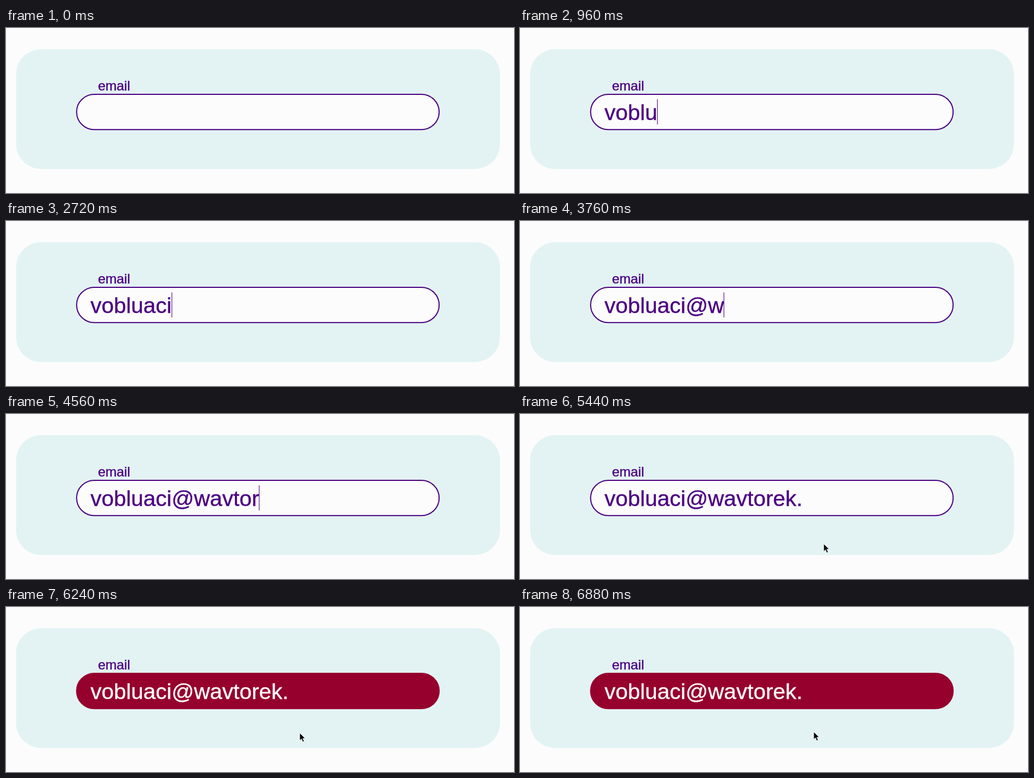
Animation, 908 px wide and 296 px high, one loop 8 s. Source, as an HTML page:

```html
<!DOCTYPE html>
<html lang="en">
<head>
<meta charset="utf-8">
<title>Email field</title>
<style>
  html, body { margin: 0; width: 100%; height: 100%; overflow: hidden; background: #fcfcfc; }
  svg { display: block; }
  text {
    font-family: "Liberation Sans", Arial, sans-serif; font-kerning: none;
    fill: #4b0082; stroke: #4b0082; stroke-width: .4;
  }
  #field { fill: #fcfcfc; stroke: #4b0082; stroke-width: 2; }
  #value { font-size: 39.5px; }
  #caret { fill: #4b0082; }
  .invalid #field { fill: #96002d; stroke: #96002d; }
  .invalid #value { fill: #fff; stroke: #fff; }
</style>
</head>
<body>
<svg id="stage" width="908" height="296" viewBox="0 0 908 296">
  <rect x="18" y="38" width="865" height="215" rx="45" fill="#e3f3f3"/>
  <text x="164.5" y="112" font-size="24">email</text>
  <rect id="field" x="126.2" y="119" width="648" height="63.3" rx="31.6"/>
  <text id="value" x="151" y="165"></text>
  <rect id="caret" y="128" width="1" height="45"/>
  <path id="pointer" d="M0 0V13.6L3.2 10.7L5.4 16L7.9 15L5.6 9.8H9.8Z" fill="#000" stroke="#fff" stroke-width=".8"/>
</svg>
<script>
const LOOP = 8000, KEY_GAP = 80;
const FOCUS = 160, LEAVE = 5440, INVALID = 6240, NUDGE = 6880;
const [stage, value, caret, pointer] =
  ["stage", "value", "caret", "pointer"].map(id => document.getElementById(id));

// Bursts of keys, each with its start time; "<" is backspace
const bursts = {
  240: "vo", 560: "bl", 960: "u", 1120: "cc", 1600: "<", 1760: "<",
  2000: "ac", 2640: "i", 3040: "@", 3760: "wa", 4160: "vto", 4560: "rek."
};
const keys = Object.entries(bursts).flatMap(([start, burst]) =>
  [...burst].map((key, i) => ({ key, time: +start + i * KEY_GAP })));

const show = (el, on) => el.setAttribute("visibility", on ? "visible" : "hidden");

function draw(t) {
  const pressed = keys.filter(k => k.time <= t).map(k => k.key);
  const typed = pressed.reduce((s, key) => key === "<" ? s.slice(0, -1) : s + key, "");
  const erasing = pressed.at(-1) === "<";
  value.textContent = typed;
  const width = typed ? value.getComputedTextLength() : 0;
  caret.setAttribute("x", Math.floor(151.3 + width));
  show(caret, t >= FOCUS && t < LEAVE && !erasing);

  const left = Math.max(0, 1 - (t - LEAVE) / 160);
  const y = (t < NUDGE ? 226 : 224) + 7 * left;
  pointer.setAttribute("transform", `translate(${525 + 18 * left} ${y})`);
  show(pointer, t >= LEAVE);
  stage.classList.toggle("invalid", t >= INVALID);
}

const start = performance.now();
function tick() {
  draw((performance.now() - start) % LOOP);
  requestAnimationFrame(tick);
}
tick();
</script>
</body>
</html>
```
